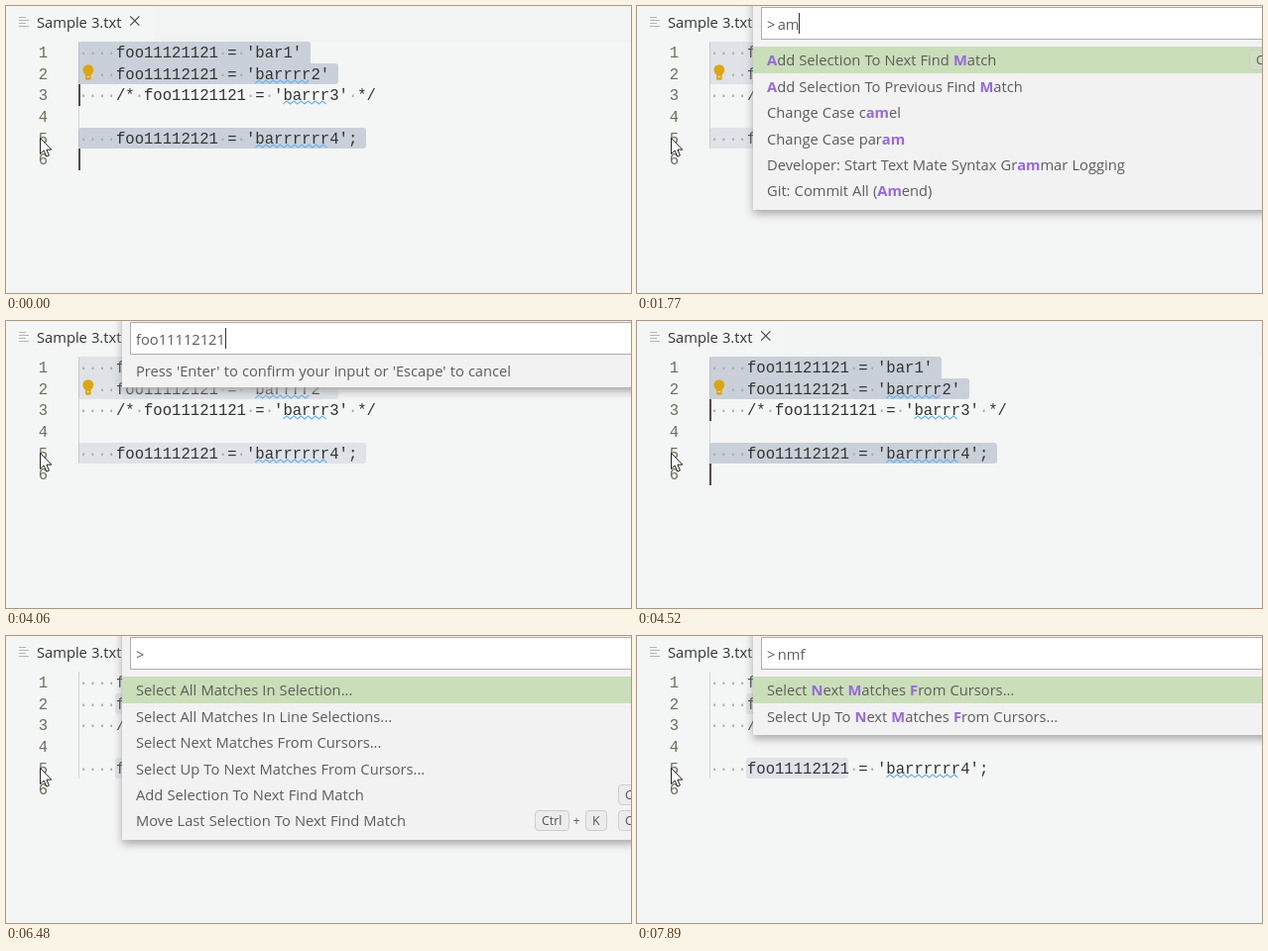
An HTML page for the animation above (8000 ms loop, 630 by 290 pixels).

```html
<!DOCTYPE html>
<html lang="en">
<head>
<meta charset="utf-8">
<title>Selecting matches in an editor</title>
<style>
  html, body { margin: 0; width: 100%; height: 100%; overflow: hidden; background: #f4f5f5; }
  svg { display: block; width: 630px; height: 290px; font: 14.7px "Open Sans", sans-serif; word-spacing: .3px; fill: #5c5c5c; }
  .tab { fill: #333; }
  .code { font: 15.6px "Liberation Mono", monospace; word-spacing: 0; fill: #333; }
  .space { fill: #aaa; }
  .number { fill: #6d705b; }
  .match { font-weight: 700; fill: #9769dc; }
  .key { font-size: 12.4px; fill: #555; }
  .hint { fill: #999; }
</style>
</head>
<body>
<svg id="stage" viewBox="0 0 630 290"></svg>
<script>
const DURATION = 8000;
const LEFT = 73.5, TOP = 36.2, CHAR = 9.36, LINE = 21.6, ROW_TOP = 41.4, ROW = 26.4;

const code = [
  "    foo11121121 = 'bar1'",
  "    foo11112121 = 'barrrr2'",
  "    /* foo11121121 = 'barrr3' */",
  "",
  "    foo11112121 = 'barrrrrr4';",
  ""
];
// [line, first column, length]
const squiggles = [[1, 19, 6], [2, 22, 5], [4, 19, 8]];
const wholeLines = { ranges: [[0, 0, 25], [1, 0, 28], [4, 0, 31]], carets: [[2, 0], [5, 0]] };
const words = { ranges: [[1, 4, 11], [4, 4, 11]], carets: [[1, 15], [4, 15]] };

// Stars mark matched letters; "|D" is a single shortcut, "|KD" a chord.
const recent = [
  "Select All Matches In Selection...",
  "Select All Matches In Line Selections...",
  "Select Next Matches From Cursors...",
  "Select Up To Next Matches From Cursors...",
  "Add Selection To Next Find Match|D",
  "Move Last Selection To Next Find Match|KD"
];
const lists = {
  ">": recent,
  ">a": [
    "Select *A*ll Matches In Selection...",
    "Select *A*ll Matches In Line Selections...",
    "Select Next M*a*tches From Cursors...",
    "Select Up To Next M*a*tches From Cursors...",
    "*A*dd Selection To Next Find Match|D",
    "*A*dd Selection To Previous Find Match"
  ],
  ">am": [
    "*A*dd Selection To Next Find *M*atch|D",
    "*A*dd Selection To Previous Find *M*atch",
    "Change Case c*am*el",
    "Change Case par*am*",
    "Developer: Start Text Mate Syntax Gr*am*mar Logging",
    "Git: Commit All (*Am*end)"
  ],
  ">ami": [
    "Select *A*ll *M*atches *I*n Line Selections...",
    "Select *A*ll *M*atches *I*n Selection..."
  ],
  ">n": [
    "Select All Matches I*n* Selection...",
    "Select All Matches I*n* Line Selections...",
    "Select *N*ext Matches From Cursors...",
    "Select Up To *N*ext Matches From Cursors...",
    "Add Selection To *N*ext Find Match|D",
    "Move Last Selection To *N*ext Find Match|KD"
  ],
  ">nm": [
    "Add Selection To *N*ext Find *M*atch|D",
    "Move Last Selection To *N*ext Find *M*atch|KD",
    "Rest Client: Switch Enviro*nm*ent",
    "Select *N*ext *M*atches From Cursors...",
    "Select Up To *N*ext *M*atches From Cursors...",
    "Terminal: Exit *N*avigation *M*ode"
  ],
  ">nmf": [
    "Select *N*ext *M*atches *F*rom Cursors...",
    "Select Up To *N*ext *M*atches *F*rom Cursors..."
  ]
};

const type = (input, caretX) => ({ input, caretX, caret: true, focusRow: 0 });
const on = { caret: true }, off = { caret: false };
const timeline = [
  [0, { selection: wholeLines, input: null, bulb: true, caret: true }],
  [160, off],
  [640, on],
  [1040, type(">", 142)],
  [1540, off],
  [1620, type(">a", 150)],
  [1770, type(">am", 163)],
  [2040, type(">ami", 167)],
  [2520, off],
  [2590, { focusRow: 1 }],
  [3050, on],
  [3280, type("", 131)],
  [3830, off],
  [4060, type("foo11112121", 221)],
  [4520, { input: null, caret: true }],
  [4590, { selection: words }],
  [4820, { bulb: false }],
  [4990, off],
  [5540, on],
  [6020, type(">", 142)],
  [6480, off],
  [6730, type(">n", 151)],
  [6960, type(">nm", 164)],
  [7360, type(">nmf", 169)],
  [7890, off]
];

const rect = (x, y, w, h, fill, extra = "") =>
  `<rect x="${x}" y="${y}" width="${w}" height="${h}" fill="${fill}" ${extra}/>`;
const text = (x, y, content, cls = "") => `<text x="${x}" y="${y}" class="${cls}">${content}</text>`;
const path = (d, style) => `<path d="${d}" ${style}/>`;
const columnX = column => LEFT + column * CHAR;
const lineY = line => Math.round(TOP + line * LINE);
const rowY = row => Math.round(ROW_TOP + row * ROW);

function drawTab() {
  return rect(148, 0, 482, 36, "#f2f3f3")
    + path("M13 11.5h7M13 14.5h10M13 17.5h7M13 20.5h10", 'stroke="#b4b6b6" fill="none"')
    + text(31, 22, "Sample 3.txt", "tab")
    + path("M125.2 10.4l9.2 9.2M134.4 10.4l-9.2 9.2", 'stroke="#3f484d" stroke-width="1.2" fill="none"');
}

function drawSelection({ ranges }, focused) {
  const fill = focused ? "#c9d0d9" : "#dfe2e7";
  return ranges.map(([line, column, length]) => {
    // A following selected line joins without a notch.
    const joined = ranges.some(r => r[0] === line + 1);
    const x = Math.floor(columnX(column)), y = lineY(line);
    const right = Math.floor(columnX(column + length));
    return rect(x, y, right - x, lineY(line + (joined ? 2 : 1)) - y, fill, 'rx="3"');
  }).join("");
}

function drawCode(bulb) {
  let out = rect(73, lineY(0), 1, lineY(5) - lineY(0), "#aaaaaa", 'opacity=".45"');
  code.forEach((line, i) => {
    const y = lineY(i) + 16;
    const hidden = bulb && i === 1 ? 2 : 0;
    const body = line.slice(hidden).replace(/ +/g, run => `<tspan class="space">${"·".repeat(run.length)}</tspan>`);
    out += text(32.7, y, i + 1, "code number") + text(columnX(hidden), y, body, "code");
  });
  for (const [line, column, length] of squiggles) {
    const start = columnX(column), width = length * CHAR, y = lineY(line);
    let d = `M${start} ${y + 20}`;
    for (let x = 3.6, up = true; x <= width; x += 3.6, up = !up) {
      d += `L${start + x} ${y + (up ? 17 : 20)}`;
    }
    out += path(d, 'stroke="#6db3ee" stroke-width="1.1" fill="none" stroke-linejoin="round"');
  }
  return out;
}

function drawBulb() {
  return '<circle cx="82.8" cy="64.6" r="5.4" fill="#dca612"/>'
    + path("M80 68h5.6v5.4q0 1.4-1.4 1.4h-2.8q-1.4 0-1.4-1.4z", 'fill="#dca612"')
    + path("M81.4 71.6h2.8", 'stroke="#f0dfae" fill="none"');
}

function drawKey(x, width, y, label) {
  return rect(x + .5, y + 3.5, width, 20, "#dddddd", 'fill-opacity=".3" stroke="#cecece" rx="3.5"')
    + text(x + 7, y + 18, label, "key");
}

function drawRow(item, i, focusRow) {
  const [label, keys] = item.split("|");
  const y = rowY(i);
  let out = i === focusRow ? rect(117, y, 513, rowY(i + 1) - y, "#cadeb9") : "";
  out += text(131, y + 19, label.replace(/\*(.+?)\*/g, '<tspan class="match">$1</tspan>'));
  if (keys) out += drawKey(617, 34, y, "Ctrl");
  if (keys === "KD") out += drawKey(533, 34, y, "Ctrl") + text(571.5, y + 18, "+", "key") + drawKey(584, 21, y, "K");
  return out;
}

function drawPalette({ input, caretX, caret, focusRow }) {
  const rows = lists[input];
  const bottom = rows ? rowY(rows.length) + 6 : 67;
  let out = rect(117, -20, 560, bottom + 24, "#a8a8a8", 'style="filter:blur(4px)"')
    + rect(117, 0, 513, bottom, "#f2f2f2")
    + rect(125.5, 1.5, 560, 32, "#fff", 'stroke="#adadad"');
  if (rows) {
    out += text(131, 24, `&gt;<tspan dx="2.3">${input.slice(1)}</tspan>`)
      + rows.map((item, i) => drawRow(item, i, focusRow)).join("");
  } else {
    out += (input ? text(131, 24, input) : text(131, 24, "Enter a search pattern", "hint"))
      + text(131, 56, "Press 'Enter' to confirm your input or 'Escape' to cancel");
  }
  return out + (caret ? rect(caretX, 7, 1, 21, "#333") : "");
}

function drawPointer() {
  return path("M34.5 133.5v16l3.7-3.4 2.6 6 2.6-1.1-2.5-5.8h4.9z",
    'fill="#fff" stroke="#222" stroke-linejoin="round"');
}

function draw(state) {
  const focused = state.input === null;
  let out = drawTab() + drawSelection(state.selection, focused) + drawCode(state.bulb);
  if (state.bulb) out += drawBulb();
  if (focused && state.caret) {
    out += state.selection.carets.map(([line, column]) =>
      rect(Math.floor(columnX(column)), lineY(line), 2, lineY(line + 1) - lineY(line), "#54494b")).join("");
  }
  if (!focused) out += drawPalette(state);
  return out + drawPointer();
}

const stage = document.getElementById("stage");
let shown = 0;

function tick() {
  const time = performance.now() % DURATION;
  const passed = timeline.filter(([at]) => at <= time);
  if (passed.length !== shown) {
    shown = passed.length;
    stage.innerHTML = draw(Object.assign({}, ...passed.map(([, change]) => change)));
  }
  requestAnimationFrame(tick);
}
tick();
</script>
</body>
</html>
```
